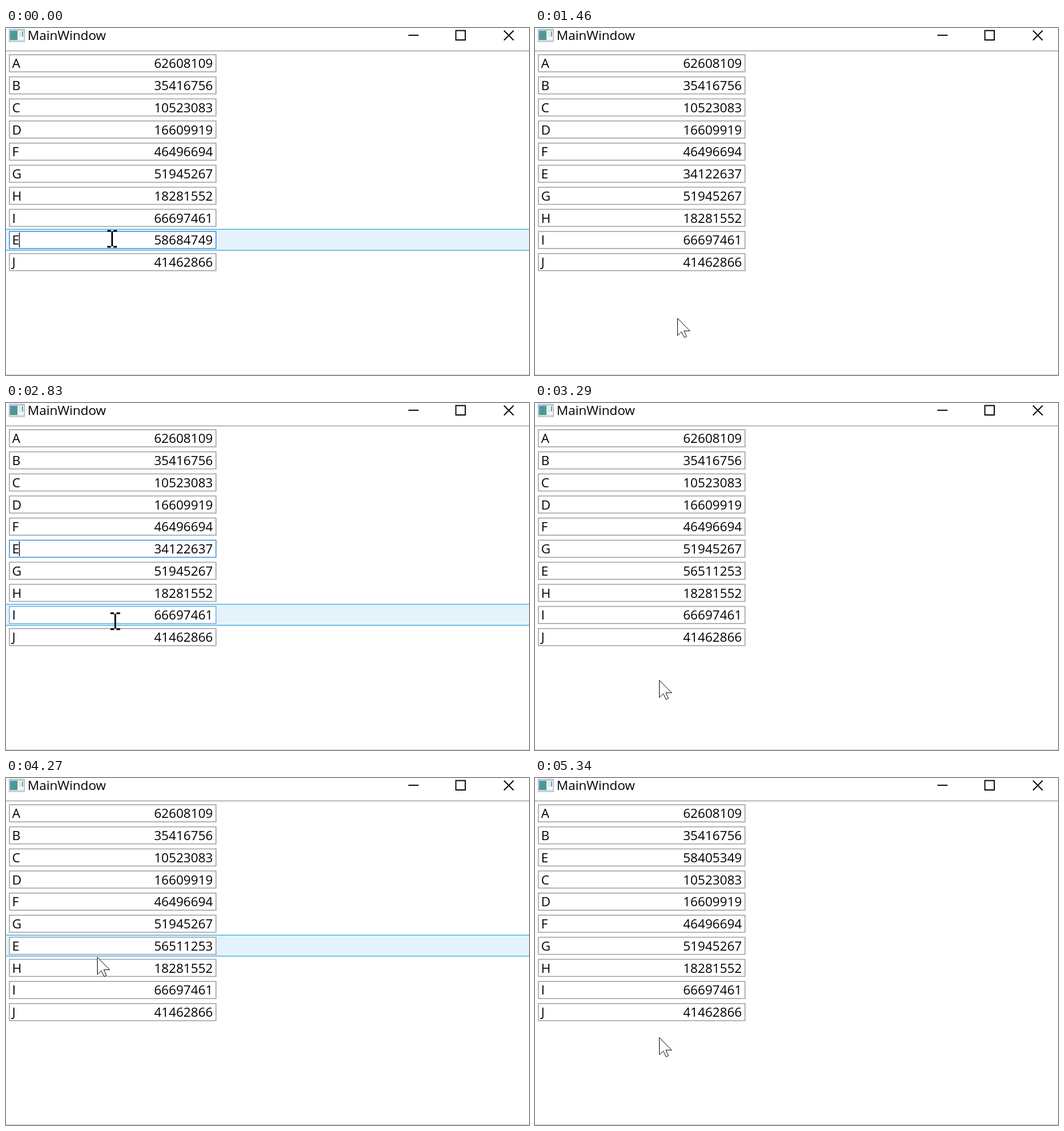
An HTML page that plays this animation: 919x609 px, repeating every 6720 ms.

```html
<!DOCTYPE html>
<html lang="en">
<head>
<meta charset="utf-8">
<title>MainWindow</title>
<style>
  html, body { margin: 0; width: 100%; height: 100%; overflow: hidden; background: #fff; }
  svg { display: block; }
  text { font: 22.6px "Open Sans", "Noto Sans", sans-serif; fill: #000; }
  .value { text-anchor: end; }
  .box { fill: #fff; stroke: #a5a6b0; stroke-width: 1.7; }
  .box.hover { stroke: #7eb4ea; }
  .box.focus { stroke: #4e98e2; }
  .button { fill: none; stroke: #000; stroke-width: 1.9; }
</style>
</head>
<body>
<svg width="919" height="609" viewBox="0 0 919 609">
  <rect width="919" height="609" fill="#fff"/>
  <g>
    <rect x="5.5" y="2" width="27" height="22" fill="#d3dde3" stroke="#a3b0b8"/>
    <rect x="6" y="2" width="26" height="3" fill="#b9cbd6"/>
    <rect x="7" y="5" width="13" height="16" fill="#4b9a91"/>
    <path d="M7 5h8l-8 11z" fill="#5a8fb5"/>
    <rect x="21" y="5" width="10" height="16" fill="#f4f7f8"/>
    <path d="M23 8h3M23 11h3M23 14h3" stroke="#a9b6bd"/>
    <path d="M29 6v9" stroke="#5ba58e" stroke-width="2"/>
  </g>
  <text x="38" y="21">MainWindow</text>
  <path class="button" d="M707 12.8h18M790.5 4.5h16.5v16.5h-16.5zM875 4.5l17 17M892 4.5l-17 17"/>
  <path d="M0 40.2H919" stroke="#a2a1a9" stroke-width="1.6"/>
  <path d="M0 608.5H919" stroke="#d3c6d3"/>
  <rect id="band" x="-2" width="923" height="36.9" fill="#e4f3fb" stroke="#55b7df" stroke-width="1.6"/>
  <g id="rows"></g>
  <path id="caret" d="M23.5 0v26" stroke="#000" stroke-width="1.4"/>
  <path id="arrow" d="M.5 .5V30.8L7.4 24.2L12.4 34.4L16.5 32.4L11.8 22.6H22.2Z"
        fill="#fff" stroke="#000"/>
  <path id="beam" d="M-8.5 -14H-2M2 -14H8.5M-8.5 14H-2M2 14H8.5M0 -13V13"
        fill="none" stroke="#000" stroke-width="2.8"/>
</svg>
<script>
const LOOP = 6720, FRAME = 70, BLINK = 460;
const TOP = 46.9, PITCH = 38.77, BOX = 30, GAP = 3.8;
const $ = id => document.getElementById(id);

const values = {
  A: 62608109, B: 35416756, C: 10523083, D: 16609919, F: 46496694,
  G: 51945267, H: 18281552, I: 66697461, J: 41462866
};

// Each move of E: when it lands, where, its new value, when it is clicked.
const drops = [
  { at: 0, slot: 8, value: 58684749, click: 0 },
  { at: 1310, slot: 5, value: 34122637, click: 2530 },
  { at: 3140, slot: 6, value: 56511253, click: 4490 },
  { at: 5190, slot: 2, value: 58405349, click: Infinity }
];

// Pointer glides, each from where the last one ended.
const home = { x: 186.5, y: 370 };
const glides = [
  { at: 140, steps: 3, x: 250, y: 509 },
  { at: 2080, steps: 3, x: 166, y: 313 },
  { at: 2290, steps: 3, x: 172, y: 258 },
  { at: 2750, steps: 2, x: 192, y: 383 },
  { at: 2910, steps: 3, x: 218, y: 486 },
  { at: 4040, steps: 4, x: 160, y: 314 },
  { at: 4350, steps: 2, x: 166, y: 295 },
  { at: 4720, steps: 6, x: 218, y: 455 }
];

function make(tag, attrs) {
  const el = document.createElementNS("http://www.w3.org/2000/svg", tag);
  for (const key in attrs) el.setAttribute(key, attrs[key]);
  return $("rows").appendChild(el);
}

const boxTop = i => TOP + PITCH * i;

const rows = Array.from({ length: 10 }, (_, i) => {
  const y = boxTop(i);
  return {
    box: make("rect", { x: 6, y, width: 363, height: BOX }),
    name: make("text", { x: 10.7, y: y + 23.3 }),
    value: make("text", { class: "value", x: 363.5, y: y + 23.3 })
  };
});

const show = (el, on) => el.setAttribute("visibility", on ? "visible" : "hidden");
const place = (el, x, y) => el.setAttribute("transform", `translate(${x} ${y})`);
const easeOut = p => 1 - (1 - p) ** 2;

function pointer(t) {
  const i = glides.findLastIndex(g => g.at <= t);
  if (i < 0) return home;
  const from = glides[i - 1] || home, to = glides[i];
  const step = Math.floor((t - to.at) / FRAME) + 1;
  const p = easeOut(Math.min(1, step / to.steps));
  return { x: from.x + (to.x - from.x) * p, y: from.y + (to.y - from.y) * p };
}

let shown;
function fill(drop) {
  if (drop === shown) return;
  shown = drop;
  const items = Object.entries(values);
  items.splice(drop.slot, 0, ["E", drop.value]);
  rows.forEach((row, i) => [row.name.textContent, row.value.textContent] = items[i]);
}

function draw(t) {
  const drop = drops.findLast(d => d.at <= t);
  const { x, y } = pointer(t);
  const focused = t >= drop.click;
  fill(drop);

  const hot = Math.floor((y - TOP + GAP) / PITCH);
  const onRow = hot >= 0 && hot < rows.length;
  const inBox = onRow && y >= boxTop(hot) && y <= boxTop(hot) + BOX;

  show($("band"), onRow);
  $("band").setAttribute("y", boxTop(hot) - GAP);
  rows.forEach(({ box }, i) => {
    const mode = focused && i === drop.slot ? "focus" : inBox && i === hot ? "hover" : "";
    box.setAttribute("class", `box ${mode}`);
  });

  show($("caret"), focused && Math.floor((t - drop.click) / BLINK) % 2 === 0);
  place($("caret"), 0, boxTop(drop.slot) + 2);
  show($("beam"), inBox);
  show($("arrow"), !inBox);
  place($(inBox ? "beam" : "arrow"), x, y);
}

const start = performance.now();
function tick() {
  draw((performance.now() - start) % LOOP);
  requestAnimationFrame(tick);
}
tick();
</script>
</body>
</html>
```
